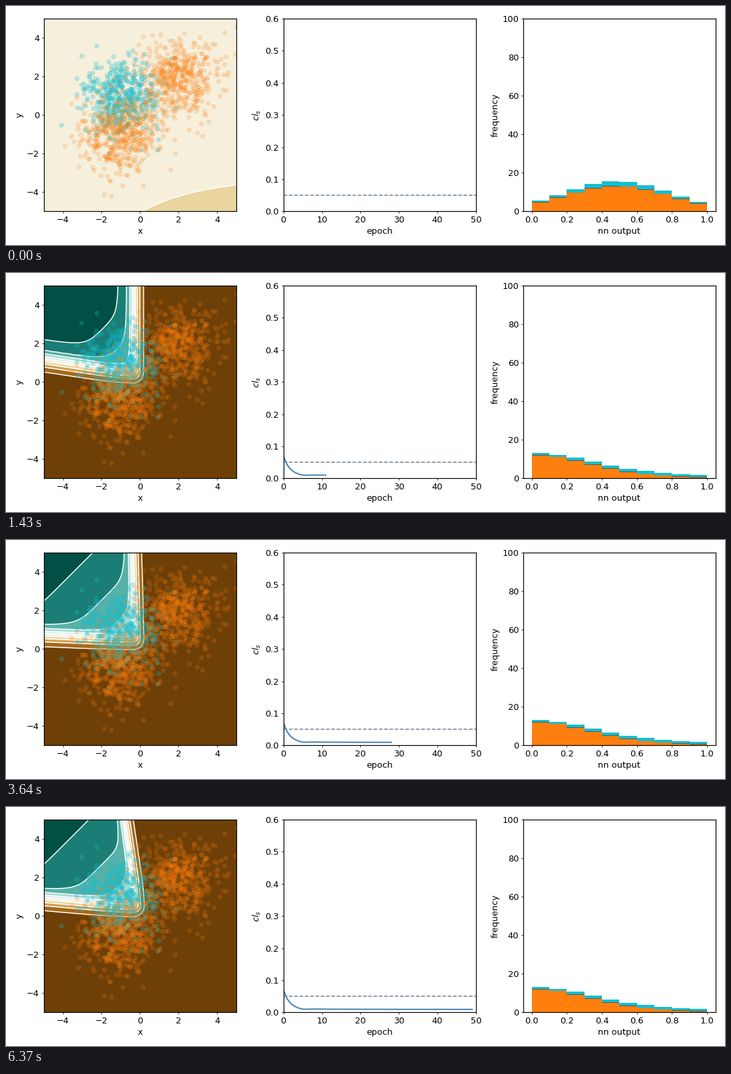
Recreate the animation shown at these times as a matplotlib script. Size 1080 by 360 pixels, loop 6500 ms.

```python
import numpy as np
import matplotlib.pyplot as plt
from matplotlib.animation import FuncAnimation

W, H, DPI = 1080, 360, 72
EPOCHS, STEP_MS = 50, 130
ORANGE, CYAN, SHADE = "#ff7f0e", "#17becf", "#3f6068"
LOGIT_01 = -2.2  # logit of the lowest contour level, 0.1

plt.rcParams.update({
    "font.family": "DejaVu Sans", "font.size": 13, "axes.linewidth": 1.2,
    "xtick.major.size": 3, "ytick.major.size": 3,
})

X, Y = np.meshgrid(np.linspace(-5, 5, 121), np.linspace(-5, 5, 121))
LEVELS = np.linspace(0, 1, 11)
BINS = np.arange(10)


def lerp(a, b, t):
    return a + (b - a) * t


def ease(t):
    t = np.clip(t, 0, 1)
    return t * t * (3 - 2 * t)


def soft_min(*parts, sharp=3.5):
    return -np.log(sum(np.exp(-sharp * p) for p in parts)) / sharp


def squash(v):
    return v - 0.55 * np.maximum(v - 1.4, 0)


def untrained():
    """Almost flat output with a lower patch along the bottom edge."""
    edge = -5 + 1.75 * (1 - np.exp((0.1 - X) / 3.2))
    z = 0.4 + 0.09 * np.tanh((Y - edge) / 4)
    return np.log(z / (1 - z))


def trained(epoch):
    """Logit of a rounded corner: two walls, a corner and a diagonal cap."""
    g = ease((epoch - 3) / 8)
    left_tilt = np.interp(epoch, [3, 11, 22, 41], [0.43, 0.15, 0.03, 0.09])
    top_tilt = lerp(0.55, 0, g) + 0.15 * ease((epoch - 20) / 26)
    cap_slope = np.interp(epoch, [3, 11, 22, 33, 41], [0.03, 0.44, 0.31, 0.25, 0.27])

    left = LOGIT_01 + lerp(1.2, 3.2, g) * (Y - lerp(-1.16, -0.08, g) + left_tilt * (X + 1))
    top = LOGIT_01 - lerp(1.25, 4.5, g) * (X - lerp(0.91, 0.22, g) + top_tilt * (Y - 1.2))
    cap = cap_slope * (Y - X) + lerp(0.3, 0.13, g)

    u, v = X - lerp(-0.95, -0.4, g), lerp(0.85, 0.57, g) - Y
    dist = np.minimum(np.maximum(u, v), 0) + np.hypot(np.maximum(u, 0), np.maximum(v, 0))
    corner = LOGIT_01 - lerp(2.2, 4.1, g) * (dist - lerp(1.68, 0.64, g))
    return soft_min(squash(left), squash(top), squash(corner), cap)


def surface(epoch):
    mix = np.interp(epoch, [0, 1, 3], [0, 0.4, 1])
    field = lerp(untrained(), trained(max(epoch, 3)), mix)
    return 1 / (1 + np.exp(-np.clip(field, -12, 12)))


def loss(t):
    settle = 0.0095 + 0.0015 * np.exp(-t / 15)
    return settle + 0.059 * np.exp(-t / 1.55) - 0.0025 * np.exp(-(t - 5) ** 2 / 3)


def hump(floor, top, centre, width, power):
    return floor + top * np.exp(-np.abs((BINS - centre) / width) ** power)


def blend(epoch, first, early, late):
    if epoch < 3:
        return lerp(first, early, epoch / 3)
    return lerp(early, late, min((epoch - 3) / 7, 1))


TOTAL = [hump(0, 15.6, 4.35, 4.3, 2), hump(0, 14, 0, 5.4, 2.15), hump(1.3, 11.9, 0, 4.63, 1.7)]
BKG = [hump(0, 13.1, 4.35, 4.3, 2), hump(0, 12.3, 0, 4.34, 1.93), hump(0.25, 11.75, 0, 4.26, 1.72)]


def panel(ax, xlabel, ylabel, xlim, ylim, xticks):
    ax.set(xlabel=xlabel, ylabel=ylabel, xlim=xlim, ylim=ylim, xticks=xticks)


fig, (ax_map, ax_loss, ax_hist) = plt.subplots(1, 3, figsize=(W / DPI, H / DPI), dpi=DPI)
panel(ax_map, "x", "y", (-5, 5), (-5, 5), range(-4, 5, 2))
panel(ax_loss, "epoch", "$cl_s$", (0, 50), (0, 0.6), range(0, 51, 10))
panel(ax_hist, "nn output", "frequency", (-0.05, 1.05), (0, 100), np.linspace(0, 1, 6))
ax_map.set_yticks(range(-4, 5, 2))
fig.tight_layout()

rng = np.random.RandomState(7)
sig, up, down = (rng.normal(mean, 1, (500, 2)) for mean in ((-1, 1), (2, 2), (-1, -1)))
ax_map.scatter(*sig.T, color=CYAN, alpha=0.25, zorder=1.5)
for pts in (up, down):
    ax_map.scatter(*pts.T, color=ORANGE, alpha=0.18, zorder=1.5)

ax_loss.axhline(0.05, color="slategray", ls="--", lw=1.5)
loss_line, = ax_loss.plot([], [], color="steelblue", lw=2)

bars = [ax_hist.bar((BINS + 0.5) / 10, 0 * BINS, width=0.1, color=c)
        for c in (ORANGE, CYAN, SHADE)]
contours = []


def set_bars(group, base, height):
    for bar, y, h in zip(group, base, height):
        bar.set_y(y)
        bar.set_height(h)


def draw(epoch):
    while contours:
        contours.pop().remove()
    z = surface(epoch)
    contours.append(ax_map.contourf(X, Y, z, LEVELS, cmap="BrBG", vmin=0, vmax=1, zorder=0.5))
    contours.append(ax_map.contour(X, Y, z, LEVELS, colors="w", linewidths=1.5, zorder=0.6))

    t = np.arange(epoch + 1)
    loss_line.set_data(t, loss(t))

    total, base = blend(epoch, *TOTAL), blend(epoch, *BKG)
    swell = np.interp(epoch, [0, 3, 8], [0, 1, 0])
    band = 0.2 + swell * np.exp(-((BINS - 5) / 1.8) ** 2)
    set_bars(bars[0], 0 * base, base)
    set_bars(bars[1], base, total - base)
    set_bars(bars[2], base, np.minimum(band, total - base))
    return []


anim = FuncAnimation(fig, draw, frames=EPOCHS, interval=STEP_MS, repeat=True, repeat_delay=0)
plt.show()
```
